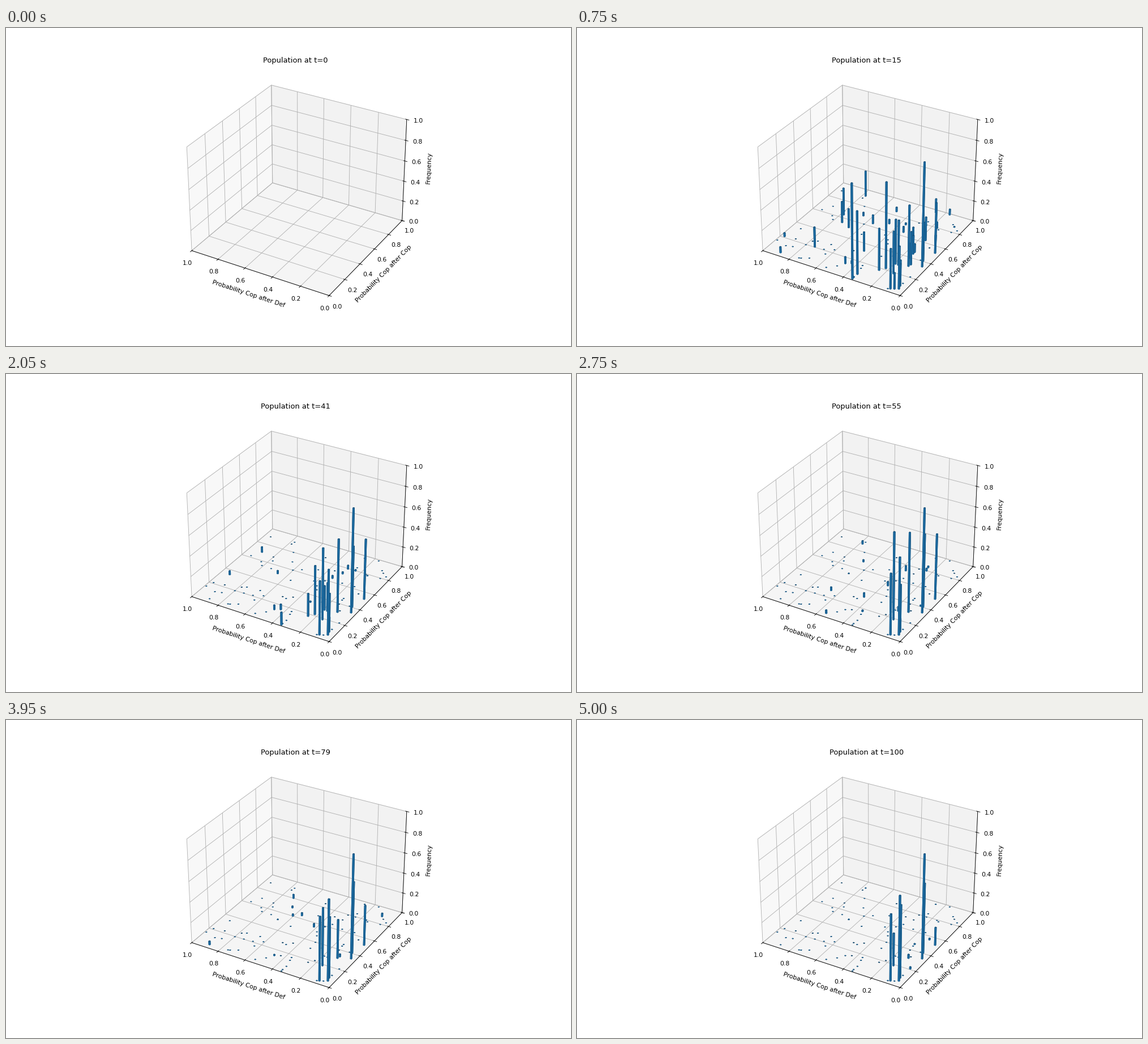
Recreate the animation shown at these times as a matplotlib script. Size 998 by 561 pixels, loop 5100 ms.

```python
import matplotlib.pyplot as plt
import numpy as np
from matplotlib.animation import FuncAnimation

W, H, DPI = 998, 561, 78
LAST = 100
SIDE = 0.01
MINOR = 84
POPS = 115

# Lasting strategies: x, y, frequency at t=7, t=55 and t=100.
LEADERS = [
    (.085, .032, .35, .59, .64),
    (.150, .186, .33, .84, .32),
    (.040, .057, .35, .74, .81),
    (.049, .088, .17, .46, .70),
    (.109, .306, .56, .77, .04),
    (.032, .343, 1, 1, 1),
    (.057, .403, .32, .71, .68),
    (.034, .522, .47, .64, .18),
]

# Strategies that hold for a while: x, y, frequency, time of extinction.
FADERS = [
    (.192, .287, .45, 53),
    (.170, .285, .45, 57),
    (.219, .213, .85, 54),
    (.246, .175, .42, 53),
    (.341, .010, .95, 43),
    (.340, .069, .65, 39),
]

rng = np.random.default_rng(11)
steps = np.arange(LAST + 1)


def leader(start, *freqs):
    return np.interp(steps, (1, 7, 55, LAST), (start, *freqs))


def fader(freq, end):
    return freq * np.clip(1 - (steps / end) ** 3, 0, 1)


def dying(start, life):
    return start * np.clip(1 - steps / life, 0, 1)


def pop(t, width=6):
    """Short comeback around time t, smaller as the leaders settle."""
    height = .035 + .045 * (1 - t / LAST)
    return height * np.clip(1 - abs(steps - t) / width, 0, 1)


def build():
    """Return x, y and the frequency curve of every strategy."""
    feet = [row[:2] for row in LEADERS + FADERS]
    curves = [leader(rng.uniform(.25, .75), *row[2:]) for row in LEADERS]
    curves += [fader(*row[2:]) for row in FADERS]

    # Cooperating less after a defection gives a longer life.
    for x, y in rng.uniform(.01, .99, (MINOR, 2)):
        life = min(2 + rng.exponential(10) * (1.4 - x), 24)
        feet.append((x, y))
        curves.append(dying(rng.uniform(.25, .9), life))

    curves = np.array(curves)
    first = len(curves) - MINOR
    for t in 8 + (LAST - 8) * rng.random(POPS) ** 1.3:
        k = rng.integers(first, len(curves))
        curves[k] = np.maximum(curves[k], pop(t))
    return *np.array(feet).T, curves


# The small surplus keeps rounding from losing a pixel.
fig = plt.figure(figsize=((W + .01) / DPI, (H + .01) / DPI), dpi=DPI)
ax = fig.add_subplot(projection="3d")
ax.set_xlim(1, 0)
ax.set_ylim(0, 1)
ax.set_zlim(0, 1)
ax.set_xlabel("Probability Cop after Def")
ax.set_ylabel("Probability Cop after Cop")
ax.set_zlabel("Frequency")

xs, ys, freqs = build()


def update(i):
    t = min(i, LAST)
    for bars in list(ax.collections):
        bars.remove()
    if t:
        ax.bar3d(xs - SIDE / 2, ys - SIDE / 2, np.zeros_like(xs),
                 SIDE, SIDE, freqs[:, t], color="C0")
    ax.set_title(f"Population at t={t}")
    return []


anim = FuncAnimation(fig, update, frames=LAST + 2, interval=50, repeat=True,
                     repeat_delay=0)
plt.show()
```
